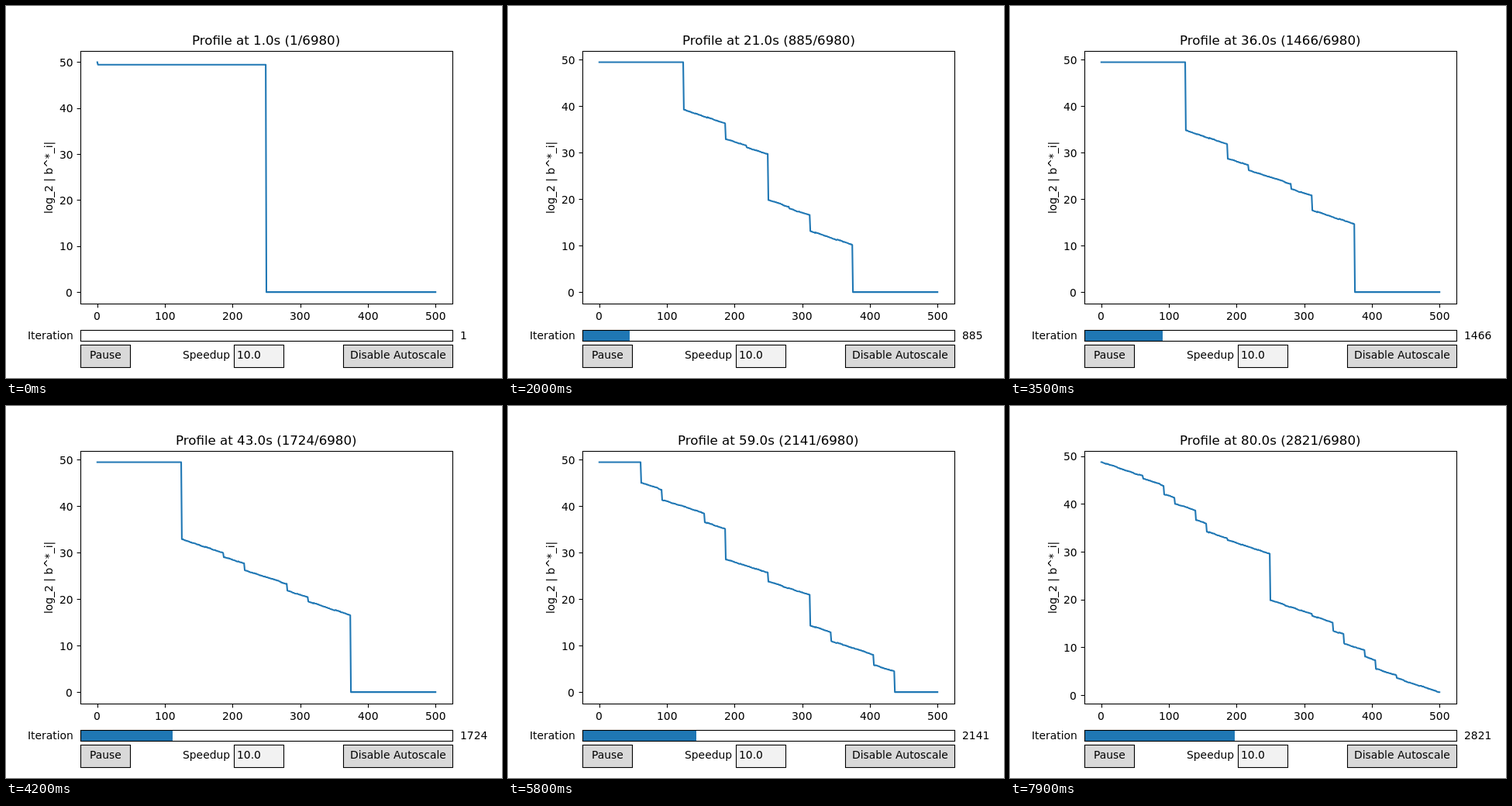
Recreate the animation shown at these times as an HTML page. Size 640 by 480 pixels, loop 8 s.

```html
<!DOCTYPE html>
<html lang="en">
<head>
<meta charset="utf-8">
<title>Profile</title>
<style>
html, body { margin: 0; width: 100%; height: 100%; overflow: hidden; background: #fff; }
svg { display: block; width: 640px; height: 480px; }
text { font: 13.889px "DejaVu Sans", sans-serif; fill: #000; }
.title { font-size: 16.667px; }
.line { fill: none; stroke: #000; stroke-width: 1.1; }
#curve { fill: none; stroke: #1f77b4; stroke-width: 2.083; stroke-linejoin: round; stroke-linecap: square; }
</style>
</head>
<body>
<svg id="stage" viewBox="0 0 640 480">
  <polyline id="curve"/>
  <rect class="line" x="96.5" y="58.5" width="480" height="326"/>
  <rect id="bar" x="96" y="418.5" height="14" fill="#1f77b4"/>
  <rect class="line" x="96.5" y="418.5" width="480" height="14"/>
  <rect class="line" x="96.5" y="437.5" width="64" height="29" style="fill:#d9d9d9"/>
  <rect class="line" x="294.5" y="437.5" width="64" height="29" style="fill:#f2f2f2"/>
  <rect class="line" x="435.5" y="437.5" width="141" height="29" style="fill:#d9d9d9"/>
</svg>
<script>
const LAST = 500, BLOCK = LAST / 16, SLOPE = 0.047, TOP = 49.45;
const STEPS = 80, STEP_MS = 100, TOTAL = 6980;
const LEFT = 0, MIDDLE = 0.5, RIGHT = 1;
const byId = id => document.getElementById(id);
const mix = (a, b, t) => a + (b - a) * t;
const xAt = i => 96 + 480 * (i + 25) / 550;

// Slight fixed unevenness along the reduced part.
function rough(i) {
  const hash = n => {
    const s = Math.sin(n * 12.9898 + 4.137) * 43758.5453;
    return s - Math.floor(s) - 0.5;
  };
  return 0.16 * hash(Math.floor(i / 8)) + 0.08 * hash(i + 600);
}

// Each cut is [block, level]: from there the level falls at a constant slope.
// The right half is the left half turned about the centre.
function profile(cuts) {
  return Array.from({ length: LAST + 1 }, (_, i) => {
    const left = i < LAST / 2;
    const p = left ? i + 0.99 : Math.max(0, LAST - 1 - i);
    const cut = cuts.findLast(([block]) => block * BLOCK <= p);
    const v = cut ? cut[1] - SLOPE * (p - cut[0] * BLOCK) : TOP;
    return (left ? v : TOP - v) + (cut && i % LAST ? rough(i) : 0);
  });
}

const poses = [
  { at: 0, count: 1, cuts: [] },
  { at: 9, count: 355, cuts: [[6, 27.9]] },
  { at: 12, count: 561, cuts: [[4, 41.8], [6, 37.5]] },
  { at: 28, count: 1208, cuts: [[4, 36.7], [6, 28.4], [7, 26.2]] },
  { at: 42, count: 1724, cuts: [[4, 32.9], [6, 29.1], [7, 26.2]] },
  { at: 54, count: 2050, cuts: [[4, 31]] },
  { at: 58, count: 2141, cuts: [[2, 45], [3, 41.4], [5, 36.6], [6, 28.6]] },
  { at: 63, count: 2372, cuts: [[1, 47.2], [3, 43.1], [4, 37.7], [6, 30.7]] },
  { at: 66, count: 2510, cuts: [[0, TOP], [1, 47.2], [3, 43.1], [4, 37.7], [6, 30.7]] },
  { at: 72, count: 2654, cuts: [[0, 48.8], [2, 45.3], [3, 42.6], [4, 37.2], [6, 31.5]] },
  { at: 79, count: 2821, cuts: [[0, 48.8], [2, 45.3], [3, 42.1], [3.5, 40.1], [4.5, 36.7], [5, 34.3], [6, 32.5]] }
];
for (const pose of poses) pose.data = profile(pose.cuts);

function add(tag, attrs) {
  const el = document.createElementNS("http://www.w3.org/2000/svg", tag);
  for (const key in attrs) el.setAttribute(key, attrs[key]);
  return byId("stage").appendChild(el);
}

// Sets text aligned about x, starting on a whole pixel.
function write(el, text, x, align) {
  el.textContent = text;
  el.setAttribute("x", Math.round(x - el.getComputedTextLength() * align));
  return el;
}
const label = (text, x, y, align, attrs) => write(add("text", { y, ...attrs }), text, x, align);

label("Iteration", 86.4, 430, RIGHT);
label("Pause", 128, 455, MIDDLE);
label("Speedup", 289, 455, RIGHT);
label("10.0", 297.6, 455, LEFT);
label("Disable Autoscale", 505.6, 455, MIDDLE);
label("log_2 | b^*_i|", 0, 0, MIDDLE, { transform: "translate(60 221) rotate(-90)" });
const title = add("text", { class: "title", y: 50 });
const counter = add("text", { y: 430 });

const yTicks = [];
for (let n = 0; n <= 5; n++) {
  const x = xAt(n * 100);
  add("path", { class: "line", d: `M${Math.round(x) + 0.5} 384.5v4.9` });
  label(n * 100, x, 405, MIDDLE);
  yTicks.push({
    value: n * 10,
    mark: add("path", { class: "line", d: "M96.5 0.5h-4.9" }),
    name: label(n * 10, 86.3, 0, RIGHT)
  });
}

function draw(k) {
  const next = Math.max(1, poses.findIndex(pose => pose.at >= k));
  const a = poses[next - 1], b = poses[next];
  const t = (k - a.at) / (b.at - a.at);
  const data = a.data.map((v, i) => mix(v, b.data[i], t));
  if (k === 0) data[0] = 50;

  // The vertical scale follows the data with a 5% margin.
  const low = Math.min(...data), range = Math.max(...data) - low;
  const yAt = v => 384 - 326.4 * (v - low + range * 0.05) / (range * 1.1);
  byId("curve").setAttribute("points",
    data.map((v, i) => xAt(i).toFixed(2) + "," + yAt(v).toFixed(2)).join(" "));
  for (const { value, mark, name } of yTicks) {
    const y = yAt(value);
    mark.setAttribute("transform", `translate(0 ${Math.round(y)})`);
    name.setAttribute("y", Math.round(y + 5.5));
  }

  const count = Math.round(mix(a.count, b.count, t));
  write(title, `Profile at ${k + 1}.0s (${count}/${TOTAL})`, 336, MIDDLE);
  write(counter, count, 585.6, LEFT);
  byId("bar").setAttribute("width", Math.round(480 * count / TOTAL));
}

let shown = -1;
const origin = performance.now();
function tick() {
  const k = Math.floor((performance.now() - origin) / STEP_MS) % STEPS;
  if (k !== shown) draw(shown = k);
  requestAnimationFrame(tick);
}
tick();
</script>
</body>
</html>
```
